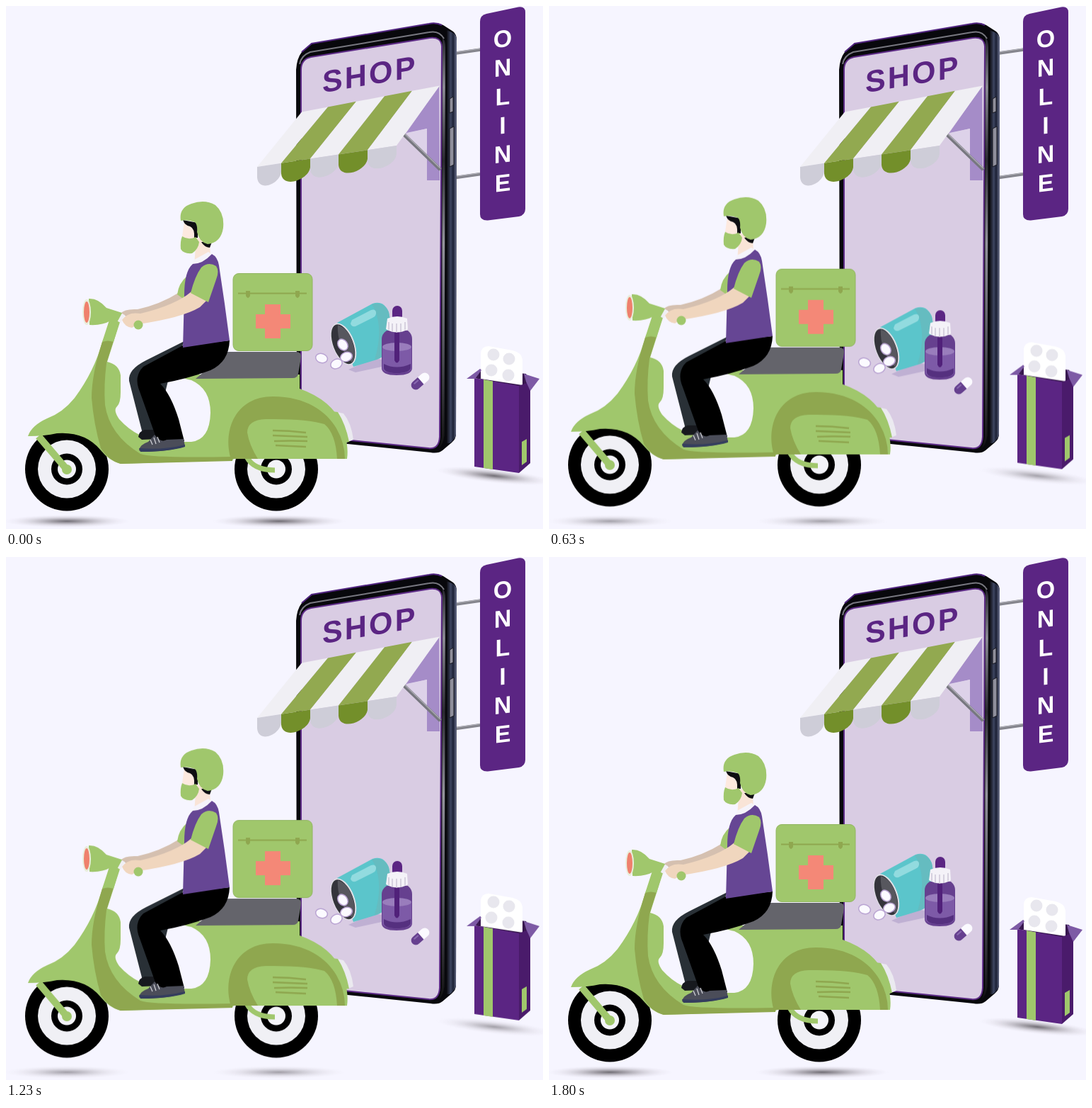
Animation, 759 px wide and 738 px high, one loop 1830 ms. Source, as an HTML page:

```html
<!DOCTYPE html>
<html lang="en">
<head>
<meta charset="utf-8">
<title>Online shop delivery</title>
<style>
  html, body { margin: 0; width: 100%; height: 100%; overflow: hidden; background: #f6f5ff; }
  svg { display: block; width: 759px; height: 738px; }
  text { font-family: "Liberation Sans", Arial, sans-serif; font-weight: 700; }

  /* every part follows one sine wave: half a loop out, half a loop back */
  .bob, .fade { animation: bob 915ms cubic-bezier(.37, 0, .63, 1) infinite alternate; }
  .fade { animation-name: fade; }
  .scooter { --dy: -8px; }
  .goods { --dy: 8px; }
  .parcel { --dy: -7px; }
  @keyframes bob { to { transform: translateY(var(--dy)); } }
  @keyframes fade { to { opacity: .5; } }

  .green { fill: #a0c76c; }
  .olive { fill: #8fa74f; }
  .plum { fill: #5b2583; }
</style>
</head>
<body>
<svg viewBox="0 0 759 738" xmlns="http://www.w3.org/2000/svg">
  <defs>
    <radialGradient id="shade">
      <stop offset="0" stop-color="#57535a" stop-opacity=".85"/>
      <stop offset=".3" stop-color="#706b72" stop-opacity=".55"/>
      <stop offset=".6" stop-color="#9a949c" stop-opacity=".28"/>
      <stop offset="1" stop-color="#d8d0da" stop-opacity="0"/>
    </radialGradient>
    <linearGradient id="steel" x1="0" x2="0" y1="0" y2="1">
      <stop offset="0" stop-color="#25252c"/>
      <stop offset=".12" stop-color="#8b8b94"/>
      <stop offset=".3" stop-color="#2a2a30"/>
      <stop offset=".5" stop-color="#94949c"/>
      <stop offset=".75" stop-color="#55555e"/>
      <stop offset="1" stop-color="#111"/>
    </linearGradient>
    <linearGradient id="edge" x1="0" x2="1" y1="0" y2="0">
      <stop offset="0" stop-color="#0d0d12"/>
      <stop offset=".4" stop-color="#3d4560"/>
      <stop offset=".65" stop-color="#1b2034"/>
      <stop offset="1" stop-color="#6d7390"/>
    </linearGradient>
    <g id="wheel">
      <circle r="59" fill="#000"/>
      <circle r="41" fill="#f0f0f5"/>
      <circle r="22" fill="#000"/>
      <circle r="13" fill="#f3f3f8"/>
    </g>
    <ellipse id="tablet" rx="8.5" ry="6.5" fill="#fbfaff" stroke="#b9a3d2" stroke-width="1.5"/>
  </defs>

  <!-- sign -->
  <g>
    <path d="M636 66.500L671 61.500M636 242L671 237" stroke="#85858d" stroke-width="4.500"/>
    <path d="M636 65L671 60M636 240.500L671 235.500" stroke="#b4b4bb" stroke-width="1.200"/>
    <path class="plum" d="M670 22Q670 13 679 11L724 1.500Q734 0 734 9V286Q734 295 725 297L681 302.500Q670 303 670 294Z"/>
    <g id="sign" fill="#fff" font-size="34" text-anchor="middle"></g>
  </g>

  <!-- phone -->
  <g>
    <path d="M410 90Q411 74 418 65L432 53L598 25Q609 22 618 27L632 36Q637 40 637 48L636 604Q636 611 630 616L617 627Q611 632 600 630L424 612Q411 609 411 598Z" fill="#08080c"/>
    <path d="M623 34L632 38Q637 41 637 49L636 604Q635 612 627 617L623 617Z" fill="url(#edge)"/>
    <path d="M617 45Q621 48 621 58L619.500 606Q618 618 612 624Q616 614 616 604Z" fill="url(#steel)"/>
    <path d="M418 65L432 53L598 25Q608 23 616 27" fill="none" stroke="#50247f" stroke-width="2"/>
    <path d="M415 82Q417 70 430 65L598 37Q612 34 619 46" fill="none" stroke="#77777f" stroke-width="2"/>
    <path d="M417 90Q417 75 431 72L599 45Q615 43 616 57L613 608Q612 626 597 624L430 607Q417 605 417 594Z" fill="#d9cce3" stroke="#5d2b86" stroke-width="2"/>
    <g fill="#8f8f9b" stroke="#17171f">
      <path d="M627 131L632 128V149L627 151Z"/>
      <path d="M627 173L633 170V224L627 227Z"/>
    </g>
    <text class="plum" font-size="43" letter-spacing="3.200" transform="matrix(1 -.17 0 1 447 122.500)">SHOP</text>
  </g>

  <!-- awning -->
  <g>
    <path d="M612 113L565 180L595 173V246H613Z" fill="#a58cc8"/>
    <path d="M566 179L595 173V214Z" fill="#ddd2e9"/>
    <path d="M562 181L614 231" stroke="#77777f" stroke-width="5"/>
    <path d="M563 180L614 229" stroke="#a9a9b0" stroke-width="1.500"/>
    <g id="awning"></g>
  </g>

  <!-- medicine -->
  <g class="bob goods">
    <path d="M484 513L520 497L537 500L531 509L494 517Z" fill="#bfb0d3"/>
    <path d="M468 447L518 420Q534 415 541 432Q547 456 537 489Q533 496 524 499L491 509Z" fill="#5bc5cb"/>
    <path d="M517 421Q534 416 541 432Q547 456 537 489Q531 497 521 499Q530 470 526 445Q523 429 517 421Z" fill="#65bcc0"/>
    <path d="M489 443L516 429Q522 427 523 432Q524 437 518 440L494 452Q488 453 487 448Z" fill="#92dbdf"/>
    <g transform="rotate(-21 477 477)">
      <ellipse cx="477" cy="477" rx="15.500" ry="31" fill="#e4e4e9"/>
      <ellipse cx="476.500" cy="477" rx="14" ry="29.500" fill="#34343b"/>
      <path d="M479 449Q491 458 490 477Q489 499 479 506Q467 477 479 449Z" fill="#57575e"/>
    </g>
    <use href="#tablet" transform="translate(476 478) rotate(55)"/>
    <use href="#tablet" transform="translate(481 495) rotate(-20)"/>
    <use href="#tablet" transform="translate(467 505) rotate(-25)"/>
    <use href="#tablet" transform="translate(446 497) rotate(15)"/>
    <path d="M538 458H568Q574 463 574 470V511Q574 521 552 521Q531 521 531 511V470Q531 463 538 458Z" fill="#66408f"/>
    <path d="M532 481V511Q533 518 552 518Q572 518 573 511V481Z" fill="#7d5aa7"/>
    <ellipse cx="552.500" cy="481" rx="20.500" ry="6" fill="#997dbc"/>
    <path d="M549 460H556V500Q552.500 507 549 500Z" fill="#51217a"/>
    <path d="M534 505Q552 514 572 505V511Q570 518 552 518Q535 518 534 511Z" fill="#55307f"/>
    <rect class="plum" x="546" y="423" width="14" height="24" rx="7"/>
    <path d="M539 441Q553 435 567 441L568 456Q553 465 537 456Z" fill="#f4f2f8"/>
    <path d="M541 446V457M546 448V460M552 448V461M558 448V460M564 446V457" stroke="#cbc6d6" stroke-width="1.500"/>
    <g transform="translate(585.500 529.500) rotate(-41)">
      <rect x="-15" y="-6.500" width="30" height="13" rx="6.500" fill="#fbfaff"/>
      <path d="M1 -6.500H-8.500A6.500 6.500 0 0 0-8.500 6.500H1Z" fill="#66408f"/>
      <path d="M-9 -3H-1" stroke="#8b6bb2" stroke-width="2"/>
    </g>
  </g>

  <!-- parcel -->
  <g transform="rotate(6 690 663)">
    <ellipse class="fade" cx="690" cy="663" rx="82" ry="10" fill="url(#shade)"/>
  </g>
  <g class="bob parcel">
    <path d="M662 525L671 512L735 519L741 531L725 537Z" fill="#38184f"/>
    <path d="M671 490Q672 480 682 480L716 486Q729 489 730 499V535L671 526Z" fill="#fff"/>
    <g fill="#e8e7ee">
      <circle cx="689" cy="492" r="8.500"/><circle cx="711" cy="498" r="8.500"/>
      <circle cx="686" cy="514" r="8.500"/><circle cx="710" cy="521" r="8.500"/>
    </g>
    <path class="plum" d="M662 525L725 536V659L662 650Z"/>
    <path d="M725 536L741 530V645L725 659Z" fill="#4a1b6b"/>
    <path d="M651 526L670 512L672 514L663 526Z" fill="#7d5aa5"/>
    <path d="M732 519L754 526L741 543L735 530Z" fill="#7d5aa5"/>
    <path class="green" d="M675 527L688 529.500V654L675 652ZM729 615L736 611V643L729 648Z"/>
  </g>

  <!-- scooter and rider -->
  <ellipse class="fade" cx="86" cy="727" rx="88" ry="9" fill="url(#shade)"/>
  <ellipse class="fade" cx="386" cy="727" rx="94" ry="9" fill="url(#shade)"/>
  <g class="bob scooter">
    <use href="#wheel" x="86" y="653.500"/>
    <use href="#wheel" x="382" y="653.500"/>
    <path d="M340 636Q350 655 380 655" fill="none" stroke="#a0c76c" stroke-width="7"/>

    <!-- body -->
    <path d="M468 573L477 575Q488 588 491 612L481 616Z" fill="#ebeaf0"/>
    <path class="green" d="M452 571L469 573Q480 590 485 615L470 617Z"/>
    <path class="green" d="M147 440L136 474Q125 515 97 553Q80 574 58 582Q36 592 31 607Q55 607 72 603Q112 600 134 627Q146 642 162 646L320 641L322 639H482Q485 620 475 590Q460 556 415 540V520H262Q240 524 262 528Q289 540 289 574Q288 612 262 615H225Q186 612 160 583Q151 570 157 565Q162 560 162 545V521Q160 506 143 502L152 474L163 440Z"/>
    <path class="olive" d="M136 474Q144 469 152 472L142 504Q138 535 140 563Q146 605 190 632Q205 638 320 636V642L162 646Q146 642 134 624Q124 590 121 553Q121 520 136 474Z"/>
    <path d="M46 607L86 654" stroke="#a0c76c" stroke-width="10"/>
    <circle class="green" cx="86" cy="654" r="7"/>
    <path class="olive" d="M318 639C306 598 325 551 377 551C424 551 453 572 467 596Q479 617 479 639H468Q466 603 450 590Q424 582 367 583Q341 584 341 602Q344 620 356 639Z"/>
    <path d="M377 599Q400 599 424 602M377 606Q402 607 426 608M379 614Q402 613 426 614M381 620Q402 621 424 622" fill="none" stroke="#8fa74f" stroke-width="2.500"/>
    <path d="M268 526Q287 512 302 488H410Q418 488 417 496L413 519Q412 525 405 525Z" fill="#64646b"/>

    <!-- delivery box -->
    <rect class="green" x="321" y="377.500" width="112" height="109" rx="8" stroke="#91b560"/>
    <path d="M328 405.500H425" stroke="#8fa74f" stroke-width="1.800"/>
    <path class="olive" d="M339 402H345V409Q342 415 339 409ZM409 402H415V409Q412 415 409 409Z"/>
    <path d="M366 421H388V435H402V455H388V469H366V455H353V435H366Z" fill="#f48877"/>

    <!-- far leg and arm -->
    <path d="M252 473L198 500Q172 513 174 529L193 603L211 602L230 525Z" fill="#293036"/>
    <path d="M187 608Q188 600 196 598L215 598V611L192 612Z" fill="#17191e"/>
    <path d="M245 404Q218 421 186 428Q167 427 162 434L174 440L192 438Q235 429 253 416Z" fill="#d5c0b0"/>
    <path class="green" d="M256 381Q244 391 242 407L253 415Z"/>

    <!-- near leg -->
    <path d="M250 479L316 472Q315 502 289 514Q257 526 218 533Q233 548 244 583L252 614L215 617L189 544Q180 523 194 509Z" fill="#000"/>
    <path d="M188 627Q189 619 201 615L210 605Q219 617 227 612L251 611L253 621Q230 629 192 629Z" fill="#4b4d59"/>
    <path d="M188 624Q222 627 253 619V622Q230 629 190 629Z" fill="#343d5e"/>
    <path d="M204 612L207 619M209 609L212 618M214 608L217 616" stroke="#d6d6dc" stroke-width="1.200"/>

    <!-- handlebar -->
    <path class="green" d="M117 413Q130 412 142 426L164 433Q165 440 160 447L152 474Q144 471 136 474L148 444Q136 451 118 450Z"/>
    <ellipse cx="114" cy="432" rx="6" ry="18" fill="#e9eedc"/>
    <ellipse cx="114" cy="432" rx="4" ry="15" fill="#ef806d"/>
    <path d="M160 446L166 435" stroke="#f0eff4" stroke-width="5"/>

    <!-- head -->
    <path d="M269 326L288 335L289 354L266 366Z" fill="#f9e4d7"/>
    <path d="M276 333H291L288 341Q280 340 276 333Z" fill="#0e0e12"/>
    <path d="M252 304L269 309L272 333L253 334L249 325Z" fill="#fde9df"/>
    <path d="M250 302L271 306V327L266 327Q267 314 260 311Q253 310 250 302Z" fill="#0e0e12"/>
    <path class="green" d="M249 325Q258 331 268 326L273 333Q272 343 263 349Q251 350 247 343Q246 332 249 325Z"/>
    <path class="green" d="M247 303Q244 285 262 279Q281 272 296 281Q309 292 307 313Q304 334 285 336Q273 333 270 319Q271 309 267 305Q256 301 247 303Z"/>

    <!-- torso and near arm -->
    <path d="M266 358L286 347L293 352L270 371L262 368Z" fill="#f5f3fa"/>
    <path d="M264 364Q278 364 291 350Q299 354 301 366L309 420L316 472L250 482L252 408Q252 374 264 364Z" fill="#664694"/>
    <path d="M262 403Q240 422 190 434Q172 431 164 443Q168 453 178 454L187 449Q249 440 274 425L285 414Z" fill="#f0d6be"/>
    <path class="green" d="M276 369Q286 360 297 367Q302 374 297 386L286 418L261 405Q267 381 276 369Z"/>
    <circle class="green" cx="187" cy="450" r="6.500"/>
  </g>
</svg>
<script>
  const add = (id, markup) => document.getElementById(id).insertAdjacentHTML('beforeend', markup);

  // sign letters, evenly stacked and tilted with the board
  [...'ONLINE'].forEach((ch, i) =>
    add('sign', `<text transform="matrix(1 -.12 0 1 702 ${58 + i * 40.7})">${ch}</text>`));

  // slanted stripes, each ending in a rounded flap
  const upperX = [418, 455, 495, 535, 574, 613];
  const lowerX = [355, 389, 430, 470, 511, 552];
  const upperY = x => 149.5 - (x - 418) * .19;
  const lowerY = x => 227 - (x - 355) * .152;
  for (let i = 0; i < 5; i++) {
    const [a, b, c, d] = [upperX[i], upperX[i + 1], lowerX[i + 1], lowerX[i]];
    const [light, dark] = i % 2 ? ['#92a950', '#738f2a'] : ['#f0eff4', '#cecdd8'];
    const [yc, yd] = [lowerY(c), lowerY(d)];
    add('awning', `<path fill="${light}" d="M${a} ${upperY(a)}L${b} ${upperY(b)}L${c} ${yc}L${d} ${yd}Z"/>
      <path fill="${dark}" d="M${d} ${yd}L${c} ${yc}V${yc + 12}C${c - 2} ${yc + 30} ${d + 2} ${yd + 36} ${d} ${yd + 15}Z"/>`);
  }
</script>
</body>
</html>
```
